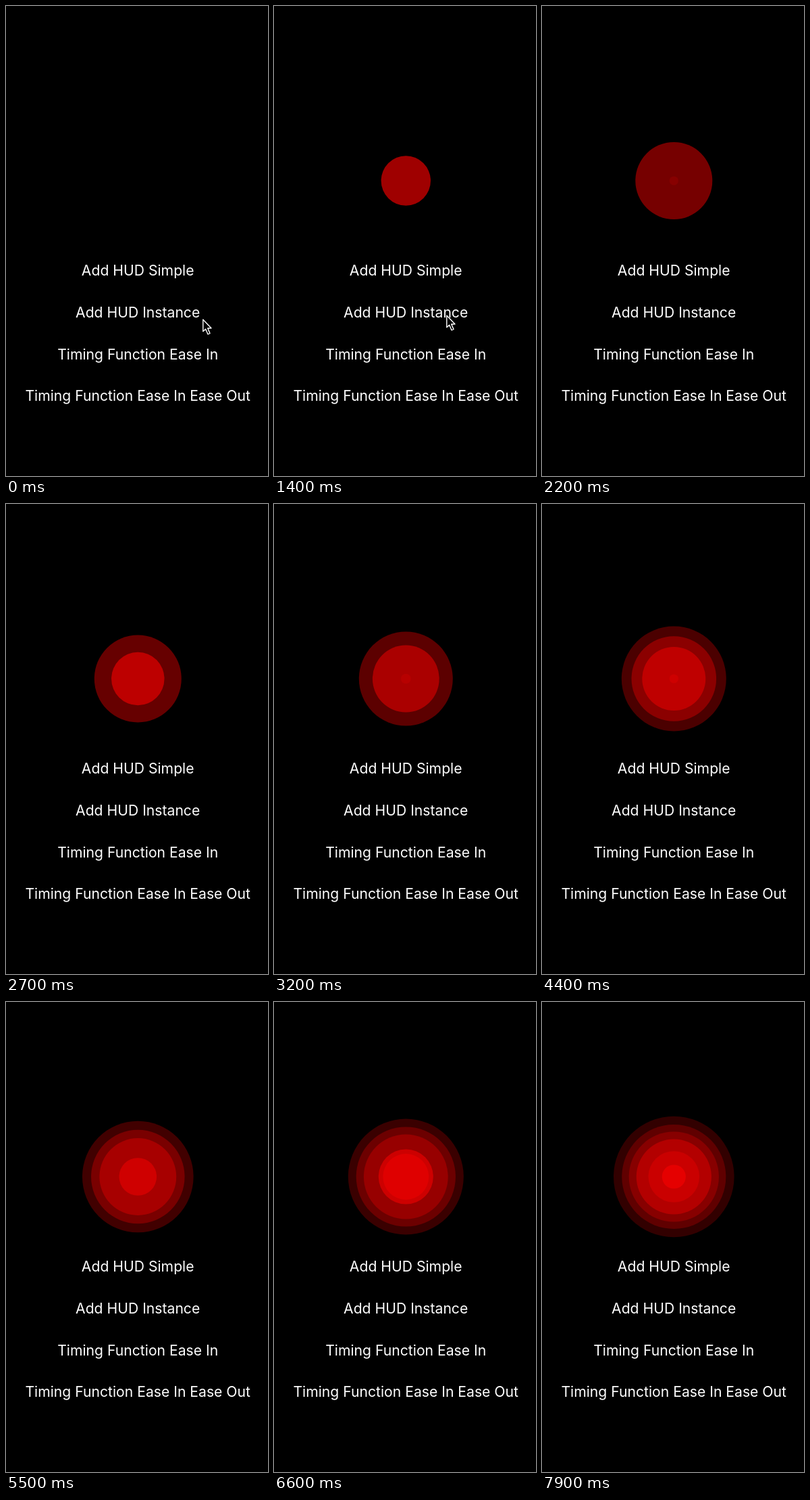
An HTML page for the animation above (8000 ms loop, 388 by 694 pixels).

```html
<!DOCTYPE html>
<html lang="en">
<head>
<meta charset="utf-8">
<title>Pulse HUD</title>
<style>
  html, body { margin: 0; width: 100%; height: 100%; overflow: hidden; background: #000; }
  svg { display: block; width: 388px; height: 694px; }
  text { font: 400 21.15px Inter, Roboto, sans-serif; fill: #fff; text-anchor: middle; }
</style>
</head>
<body>
<svg viewBox="0 0 388 694">
  <g id="rings" fill="#f00"></g>
  <text x="195.2" y="398">Add HUD Simple</text>
  <text x="195.2" y="460">Add HUD Instance</text>
  <text x="195.2" y="522">Timing Function Ease In</text>
  <text x="195.2" y="583">Timing Function Ease In Ease Out</text>
  <path id="cursor" d="M.8 1V18.6L4.7 14.9L8 22.7L11 21.4L7.7 13.8H13Z"
        fill="#000" stroke="#fff" stroke-width="1.4" stroke-linejoin="round"/>
</svg>
<script>
const LOOP = 8000, STEP = 100;
const CURSOR_HIDE = 1600;

// [birth in ms, scale] of each ring
const PULSES = [[1000, 1], [2120, 0.895], [3100, 0.8],
  [4250, 0.48], [5800, 0.81], [7570, 0.58]];

// [age in ms, radius]: linear up to the first point, then logarithmic in age
const GROWTH = [[400, 36.7], [800, 50], [1200, 57], [1700, 64.5], [2200, 69.5],
  [3400, 77.5], [4400, 82], [5600, 85.5], [6900, 89.3]];

// [time, x, y] of the pointer tip
const PATH = [[0, 291, 462], [100, 291, 462], [500, 304, 453],
  [1000, 304, 453], [1300, 255, 456], [LOOP, 255, 456]];

const cursor = document.getElementById('cursor');
const group = document.getElementById('rings');
const rings = PULSES.map(([birth, scale]) => {
  const el = document.createElementNS('http://www.w3.org/2000/svg', 'circle');
  el.setAttribute('cx', 195.3);
  el.setAttribute('cy', 258);
  group.appendChild(el);
  return { el, birth, scale };
});

const mix = (a, b, k) => a + (b - a) * k;

function radius(age) {
  if (age <= 0) return 0;
  const [t0, r0] = GROWTH[0];
  if (age <= t0) return r0 * age / t0;
  let i = 1;
  while (i < GROWTH.length - 1 && age > GROWTH[i][0]) i++;
  const [ta, ra] = GROWTH[i - 1], [tb, rb] = GROWTH[i];
  return mix(ra, rb, Math.log(age / ta) / Math.log(tb / ta));
}

// Quick fade in, then a fade out tied to the size
const opacity = r => Math.min(0.017 * r, 0.93 - 0.0082 * r);

function drawCursor(t) {
  const i = PATH.findIndex(p => p[0] > t);
  const [ta, xa, ya] = PATH[i - 1], [tb, xb, yb] = PATH[i];
  const k = (t - ta) / (tb - ta), e = k * k * (3 - 2 * k);
  cursor.setAttribute('transform', `translate(${mix(xa, xb, e)} ${mix(ya, yb, e)})`);
  cursor.setAttribute('visibility', t < CURSOR_HIDE ? 'visible' : 'hidden');
}

function draw(t) {
  for (const { el, birth, scale } of rings) {
    const r = radius(t - birth);
    el.setAttribute('r', r * scale);
    el.setAttribute('fill-opacity', opacity(r));
  }
  drawCursor(t);
}

const start = performance.now();
function tick() {
  const t = (performance.now() - start) % LOOP;
  draw(Math.floor(t / STEP) * STEP);
  requestAnimationFrame(tick);
}
tick();
</script>
</body>
</html>
```
